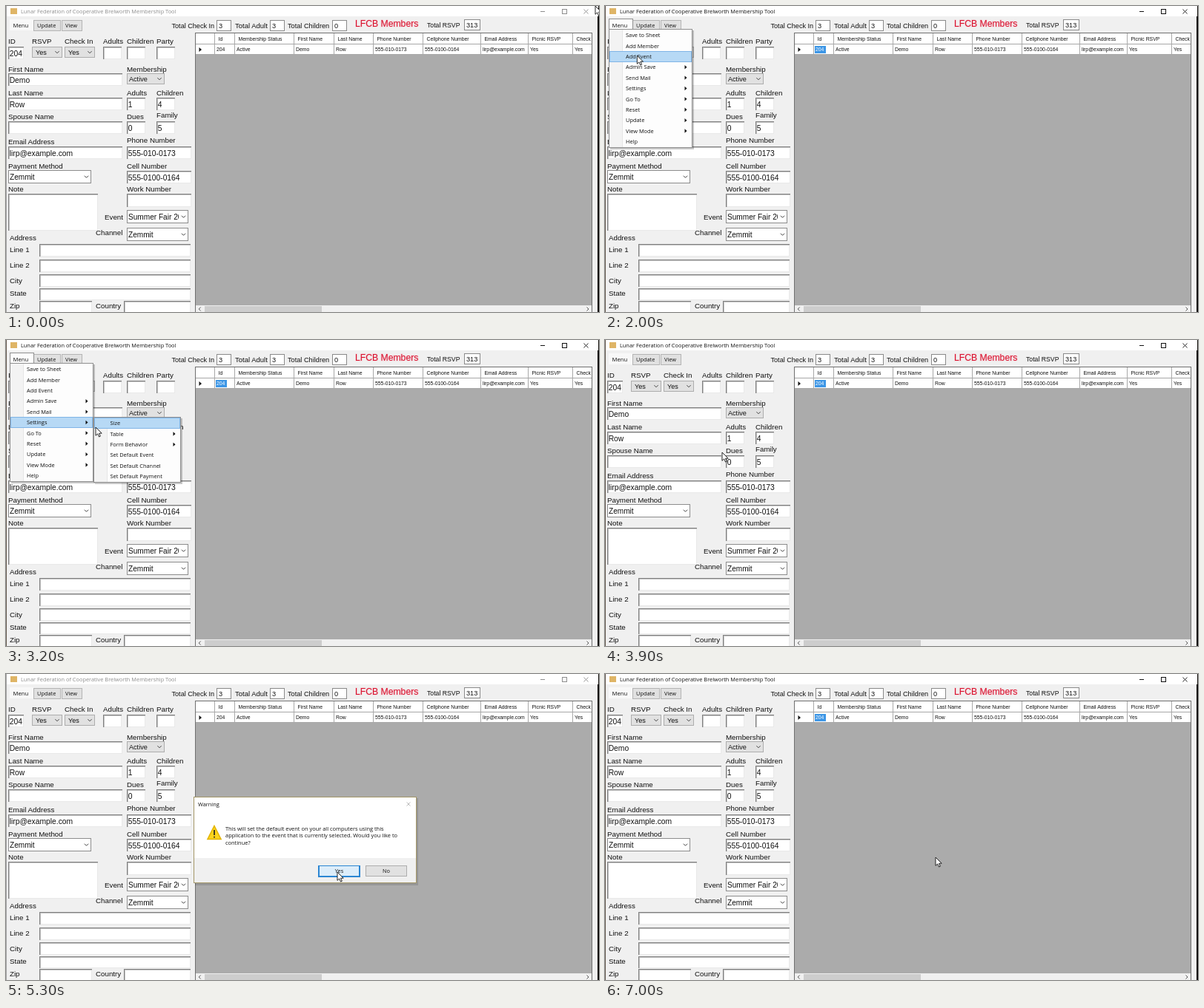
An HTML page that plays this animation: 800 px wide and 414 px high, repeating every 7.1 s.

```html
<!DOCTYPE html>
<html lang="en">
<head>
<meta charset="utf-8">
<title>Membership Tool</title>
<style>
  html, body { margin: 0; width: 100%; height: 100%; overflow: hidden; background: #f0f0f0; }
  svg { display: block; width: 800px; height: 414px; }
  text { white-space: pre; }
  rect, line { shape-rendering: crispEdges; }
</style>
</head>
<body>
<svg id="stage" viewBox="0 0 800 414" xmlns="http://www.w3.org/2000/svg"></svg>
<script>
const LOOP = 7100, STEP = 100;
const ARIAL = "'Liberation Sans', Arial, sans-serif";
const UI = "'Open Sans', 'Noto Sans', sans-serif";

// Drawing helpers; text is placed by its vertical centre.
const rect = (x, y, w, h, fill, extra = '') =>
  `<rect x="${x}" y="${y}" width="${w}" height="${h}" fill="${fill}" ${extra}/>`;
const frame = (x, y, w, h, fill, stroke) =>
  rect(x + .5, y + .5, w - 1, h - 1, fill, `stroke="${stroke}"`);
const path = (d, stroke, width = 1, fill = 'none') =>
  `<path d="${d}" fill="${fill}" stroke="${stroke}" stroke-width="${width}"/>`;
const text = (x, y, s, size, fill = '#111', font = ARIAL, extra = '') =>
  `<text x="${x}" y="${(y + size * .36).toFixed(2)}" font-family="${font}" font-size="${size}" fill="${fill}" ${extra}>${s}</text>`;
const ui = (x, y, s, fill = '#111', size = 7.4, extra = '') => text(x, y, s, size, fill, UI, extra);
const group = (id, body, extra = '') => `<g id="${id}" ${extra}>${body}</g>`;

const chevron = (x, y) => path(`M${x - 2.6} ${y - 1.3}l2.6 2.6l2.6 -2.6`, '#444');

// Sunken text box: dark top and left edges, pale bottom and right ones.
function field(x, y, w, h, value = '') {
  return rect(x, y, w, h, '#808080') + rect(x + 1, y + 1, w - 1, h - 1, '#c4c4c4') +
    rect(x + 2, y + 2, w - 2, h - 2, '#e9e9e9') + rect(x + 2, y + 2, w - 3, h - 3, '#fff') +
    text(x + 1.7, y + h / 2 + .3, value, 10.3);
}

function combo(x, y, w, h, value) {
  return frame(x, y, w, h, '#fff', '#8c8c8c') + text(x + 2, y + h / 2 + .2, value, 10.1) +
    rect(x + w - 13, y + 1, 12, h - 2, '#fff') + chevron(x + w - 6.5, y + h / 2);
}

const grayCombo = (x, y, w, value, dx, fill = '#e1e1e1', stroke = '#adadad') =>
  frame(x, y, w, 15, fill, stroke) + text(x + dx, y + 7.5, value, 9.1) + chevron(x + w - 7, y + 7.5);

function titleBar(color, edge) {
  return ui(20, 7.2, 'Lunar Federation of Cooperative Brelworth Membership Tool', color, 7.4) +
    rect(721, 7, 6, 1, color) + frame(750, 4, 7, 7, 'none', color) +
    path('M779.5 4.5l6 6m0 -6l-6 6', color, .9) + rect(0, 0, 1, 414, edge);
}

function form() {
  const labels = [
    [3, 47, 'ID'], [35, 47, 'RSVP'], [79, 47, 'Check In'], [131, 47, 'Adults'], [163, 47, 'Children'],
    [203, 47, 'Party'], [3, 85, 'First Name'], [163, 85, 'Membership'], [3, 117, 'Last Name'],
    [163, 117, 'Adults'], [203, 117, 'Children'], [3, 149, 'Spouse Name'], [163, 149.5, 'Dues'],
    [203, 147.5, 'Family'], [3, 183, 'Email Address'], [163, 181, 'Phone Number'],
    [3, 216, 'Payment Method'], [163, 216, 'Cell Number'], [3, 247, 'Note'], [163, 247, 'Work Number'],
    [133, 285, 'Event'], [121, 306.5, 'Channel'], [5, 313, 'Address'], [5, 329.5, 'Line 1'],
    [5, 350.5, 'Line 2'], [5, 371, 'City'], [5, 388, 'State'], [5, 405.5, 'Zip'], [121, 405.5, 'Country']
  ];
  const fields = [
    [3, 55, 21, 17, '204'], [131, 55, 25, 17], [163, 55, 25, 17], [203, 55, 25, 17],
    [3, 91, 154, 17, 'Demo'], [3, 124, 154, 17, 'Row'], [3, 156, 154, 17],
    [163, 124, 25, 17, '1'], [203, 124, 25, 17, '4'], [163, 156, 25, 17, '0'], [203, 156, 25, 17, '5'],
    [3, 190, 154, 17, 'lirp@example.com'], [163, 190, 87, 17, '555-010-0173'],
    [163, 223, 87, 17, '555-0100-0164'], [3, 254, 121, 50], [163, 254, 87, 18],
    [45, 322, 204, 17], [45, 343, 204, 17], [45, 363, 204, 17], [45, 382, 204, 16],
    [45, 399, 71, 17], [159, 399, 90, 17]
  ];
  return labels.map(([x, y, s]) => text(x, y, s, 9.75)).join('') +
    fields.map(f => field(...f)).join('') +
    grayCombo(35, 55, 41, 'Yes', 5) + grayCombo(79, 55, 41, 'Yes', 5) + grayCombo(163, 91, 51, 'Active', 3) +
    combo(3, 222, 112, 18, 'Zemmit') + combo(163, 276, 83, 18, 'Summer Fair 20') +
    combo(163, 300, 83, 18, 'Zemmit');
}

function topStrip() {
  const totals = [
    [223.5, 'Total Check In', 9.1, 284, '3'], [309, 'Total Adult', 9.5, 356, '3'],
    [380, 'Total Children', 9.2, 440, '0'], [568, 'Total RSVP', 8.7, 618, '313']
  ];
  return rect(5, 18, 32, 15, '#f8f8f8') + ui(9.5, 26, 'Menu', '#111', 7.7) +
    frame(37, 19, 37, 15, '#e1e1e1', '#b4b4b4') + ui(42, 26.5, 'Update') +
    frame(75, 19, 28, 15, '#e1e1e1', '#b4b4b4') + ui(80, 26.5, 'View') +
    totals.map(([x, s, size, bx, v], i) => {
      const y = i === 3 ? 25.5 : 26.5;
      return text(x, y, s, size) + frame(bx, y - 7.5, i === 3 ? 22 : 20, 15, '#fff', '#8a8a8a') +
        text(bx + 3, y + .3, v, 9.2);
    }).join('') +
    text(471, 24, 'LFCB Members', 12.2, '#d8102c', ARIAL, 'stroke="#f6b8c4" stroke-width="1.6" stroke-opacity=".45" paint-order="stroke"');
}

function table() {
  const cols = [
    [282, 'Id', '204'], [309, 'Membership Status', 'Active'], [389, 'First Name', 'Demo'],
    [443, 'Last Name', 'Row'], [496, 'Phone Number', '555-010-0173'],
    [563, 'Cellphone Number', '555-0100-0164'], [641, 'Email Address', 'lirp@example.com'],
    [705, 'Picnic RSVP', 'Yes'], [765, 'Check', 'Yes']
  ];
  return rect(255, 36, 536, 378, '#ababab') + rect(256, 37, 534, 29, '#fff') +
    cols.map(([x, head, cell]) => rect(x - 1, 37, 1, 29, '#a8a8a8') +
      text(x + 4.5, 44.2, head, 6.85) + text(x + 2, 58.8, cell, 6.85)).join('') +
    rect(256, 51, 534, 1, '#a8a8a8') + rect(256, 65, 534, 1, '#a8a8a8') +
    path('M260.5 56l3.5 3l-3.5 3z', 'none', 0, '#111') +
    rect(256, 405, 534, 9, '#f0f0f0') + rect(268, 405.5, 158, 9, '#cdcdcd') +
    path('M262.7 407.5l-2.5 2.5l2.5 2.5M783.5 407.5l2.5 2.5l-2.5 2.5', '#555') +
    rect(255, 36, 1, 378, '#707070') + rect(255, 36, 536, 1, '#707070') + rect(790, 36, 1, 378, '#707070');
}

// Menus
const ROW = 14.38;
const MENU = ['Save to Sheet', 'Add Member', 'Add Event', 'Admin Save', 'Send Mail', 'Settings',
  'Go To', 'Reset', 'Update', 'View Mode', 'Help'];
const SUB = ['Size', 'Table', 'Form Behavior', 'Set Default Event', 'Set Default Channel', 'Set Default Payment'];

function popup(x, y, w, items, dx, hasArrow, pick) {
  const h = items.length * ROW + 2;
  let out = rect(x + 2, y + 2, w, h, '#000', 'opacity=".22"') + frame(x, y, w, h, '#fdfdfd', '#8f8f8f') +
    rect(x + 1, y + 1, 17, h - 2, '#f3f3f3') + rect(x + 18, y + 1, 1, h - 2, '#e6e6e6');
  items.forEach((s, i) => {
    const top = y + 1 + i * ROW, mid = top + ROW / 2;
    if (i === pick) out += rect(x + 1.5, top + .5, w - 3, ROW - 1, '#b7d9f5', 'stroke="#7fb4e6"');
    out += ui(x + dx, mid, s);
    if (hasArrow(i)) out += path(`M${x + w - 10.5} ${mid - 2.7}l3 2.7l-3 2.7z`, 'none', 0, '#111');
  });
  return out;
}

function dialog(hover) {
  const lines = ['This will set the default event on your all computers using this',
    'application to the event that is currently selected. Would you like to', 'continue?'];
  return rect(255, 168, 301, 118, '#000', 'opacity=".12"') + frame(253, 166, 301, 117, '#fff', '#a49768') +
    rect(254, 249, 299, 33, '#f0f0f0') + ui(259, 176.5, 'Warning') +
    path('M540.5 173.5l5 5m0 -5l-5 5', '#b5b5b5', .9) +
    path('M281 205.5L290 223.5H272Z', '#e3b505', 1.6, '#fdd41c') +
    path('M281 211V218M281 219.7V221.6', '#222', 1.7) +
    lines.map((s, i) => ui(296, 209 + i * 9.6, s, '#111', 7.45)).join('') +
    rect(421.8, 259.3, 55, 14.5, hover ? '#dcedfa' : '#e1e1e1', 'stroke="#2b86d3" stroke-width="1.5"') +
    frame(485, 259, 56, 15, '#e1e1e1', '#adadad') +
    ui(449.5, 266.5, 'Yes', '#111', 7.4, 'text-anchor="middle"') +
    ui(513, 266.5, 'No', '#111', 7.4, 'text-anchor="middle"');
}

const stage = document.getElementById('stage');
stage.innerHTML =
  rect(0, 0, 800, 414, '#f0f0f0') + rect(0, 0, 800, 14, '#fff') + rect(6, 3, 9, 8, '#dfb566') +
  topStrip() + form() + table() +
  group('inactive', titleBar('#8d8d8d', '#a5a5a5')) +
  group('active', titleBar('#111', '#665b50') + rect(283, 54, 15, 10, '#3d96e6') + text(284, 58.8, '204', 6.85, '#fff')) +
  group('rsvp', grayCombo(35, 55, 41, 'Yes', 5, '#e0ecf7', '#9cc3e6')) +
  rect(799, 0, 1, 14, '#16130f') + rect(798, 14, 2, 400, '#16130f') +
  group('menu', '') + group('dialog', '') +
  group('cursor', path('M0 0V11.3L2.7 8.9L4.5 13L6.3 12.2L4.6 8.2H8.2Z', '#111', .9, '#fff'));

const el = id => document.getElementById(id);
const show = (id, on) => el(id).setAttribute('display', on ? 'inline' : 'none');

// Pointer stops: time, x, y
const STOPS = [
  [100, 795, 0], [800, 290, 160], [1300, 62, 62], [1400, 24, 32], [1700, 22, 28], [2400, 76, 127],
  [2600, 84, 110], [3000, 84, 110], [3200, 121, 118], [3700, 158, 152], [4500, 158, 152],
  [5100, 447, 268], [6400, 447, 268], [7000, 446, 248]
];

function pointer(t) {
  const i = STOPS.findIndex(s => s[0] >= t);
  if (i <= 0) return STOPS[0].slice(1);
  const [t0, x0, y0] = STOPS[i - 1], [t1, x1, y1] = STOPS[i];
  const p = (t - t0) / (t1 - t0), e = t < 1400 ? p : p * p * (3 - 2 * p);
  return [x0 + (x1 - x0) * e, y0 + (y1 - y0) * e];
}

function render(t) {
  const [x, y] = pointer(t);
  const active = (t >= 600 && t < 4200) || t >= 5500;
  show('active', active);
  show('inactive', !active);
  show('rsvp', t >= 1300 && t < 1500);

  const menuOpen = t >= 1700 && t < 3900, subOpen = t >= 3000 && t < 3900;
  let menu = '';
  if (menuOpen) {
    const inSub = subOpen && x > 118;
    const row = inSub ? 5 : Math.floor((y - 32.4) / ROW);
    menu = frame(5, 17, 33, 16, '#fdfdfd', '#8f8f8f') + ui(9.5, 26, 'Menu', '#111', 7.7) +
      popup(5, 31.4, 113, MENU, 23, i => i > 2 && i < 10, row);
    if (subOpen) {
      menu += popup(118, 104.4, 118, SUB, 22.5, i => i === 1 || i === 2,
        inSub ? Math.floor((y - 105.4) / ROW) : -1);
    }
  }
  el('menu').innerHTML = menu;

  const dialogOpen = t >= 4300 && t < 5500;
  const fading = t < 4400 || t >= 5400;
  el('dialog').innerHTML = dialogOpen ? dialog(x > 421 && y > 259) : '';
  const k = fading ? .983 : 1;
  el('dialog').setAttribute('transform', `translate(403.5 224.5) scale(${k}) translate(-403.5 -224.5)`);
  el('dialog').setAttribute('opacity', !fading ? 1 : t < 4400 ? .72 : .5);

  el('cursor').setAttribute('transform', `translate(${x.toFixed(1)} ${y.toFixed(1)})`);
}

const start = performance.now();
let last = -1;
function tick() {
  const t = Math.floor(((performance.now() - start) % LOOP) / STEP) * STEP;
  if (t !== last) render(last = t);
  requestAnimationFrame(tick);
}
tick();
</script>
</body>
</html>
```
